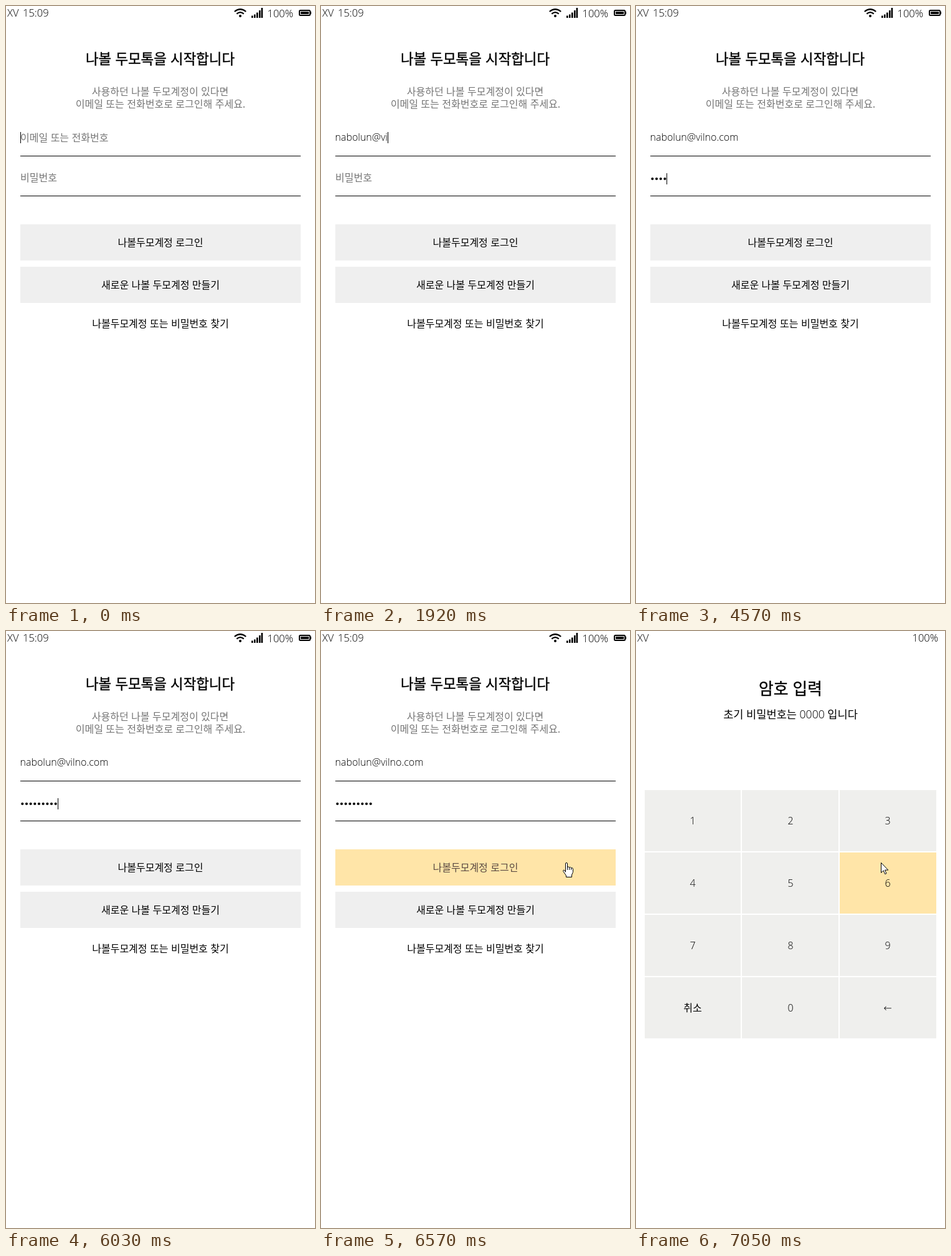
These frames come from a looping animation (496x957 px, 7.65 s). An HTML page:

```html
<!DOCTYPE html>
<html lang="ko">
<head>
<meta charset="utf-8">
<style>
  html, body { margin: 0; width: 100%; height: 100%; overflow: hidden; background: #fff; }
  svg { display: block; width: 100vw; height: 100vh; }
  text { font: 300 16px "Noto Sans CJK KR", "Noto Sans KR", "Noto Sans CJK JP", sans-serif; }
  .mid { text-anchor: middle; }
  .gray { fill: #757575; }
  .latin { font-family: "Open Sans", "Noto Sans CJK KR", sans-serif; }
  .status { font-size: 16.5px; }
  .title { font-weight: 500; stroke: #000; stroke-width: .4; }
  .line { fill: none; stroke: #000; stroke-width: 2.2; }
</style>
</head>
<body>
<svg viewBox="0 0 496 957">
  <text class="latin status" x="2" y="17">XV</text>

  <g id="login">
    <text class="latin status" x="27" y="17">15:09</text>
    <g class="line">
      <path d="M366.8 9Q376 1.5 385.2 9M370.3 12.6Q376 7.6 381.7 12.6"/>
      <rect x="471" y="7" width="17" height="8" rx="1.5" stroke-width="2"/>
    </g>
    <circle cx="376" cy="16" r="2"/>
    <path d="M394 15.5h2.6V19H394zM398 13.5h2.6V19H398zM402 10.5h2.6V19H402zM406 7h2.6v12H406zM409.6 3h2.6v16h-2.6z"/>
    <path d="M473 9h13v4h-13zM488 9h2v4h-2z"/>
    <text class="latin status" x="419.5" y="18">100%</text>

    <text class="mid title" x="247.5" y="93.3" style="font-size:22.4px">나볼 두모톡을 시작합니다</text>
    <text class="mid gray" x="247.5" y="143">사용하던 나볼 두모계정이 있다면</text>
    <text class="mid gray" x="248" y="163">이메일 또는 전화번호로 로그인해 주세요.</text>

    <text id="mailHint" class="gray" x="23" y="217">이메일 또는 전화번호</text>
    <text id="mail" class="latin" x="22.5" y="216"></text>
    <path d="M23 240h450v1H23zM23 304h450v1H23z"/>
    <text id="passHint" class="gray" x="23" y="281">비밀번호</text>
    <g id="dots"></g>
    <rect id="caret" width="1" height="18"/>

    <rect id="button" x="23" y="350" width="450" height="58"/>
    <text id="label" class="mid" x="248" y="385">나볼두모계정 로그인</text>
    <rect x="23" y="418" width="450" height="58" fill="#efefef"/>
    <text class="mid" x="248" y="453">새로운 나볼 두모계정 만들기</text>
    <text class="mid" x="248" y="515">나볼두모계정 또는 비밀번호 찾기</text>
    <path id="hand" fill="#fff" stroke="#000" stroke-linejoin="round"
      d="M392.5 386.5V373q0-1.5 1.5-1.5t1.5 1.5v5.5q1.5-1.5 3 .5 1.7-1.2 3 .7 3-.8 3 2.3v4.5l-2 4.5v3.5h-9v-2.5l-4.5-6.5q-1-2 .8-2.3 1.2 0 2.7 2.8M395.5 378v5M398.5 379v4M401.5 380v3"/>
  </g>

  <g id="pin">
    <text class="latin status" x="443.5" y="17">100%</text>
    <text class="mid title" x="248" y="102" style="font-size:25.8px">암호 입력</text>
    <text class="mid latin" x="248" y="139.5" style="font-size:17.6px">초기 비밀번호는 0000 입니다</text>
    <g id="keys"></g>
    <path fill="#fff" stroke="#000" d="M393.5 371.5v16l3.7-3.5 2.5 5.7 2.3-1-2.5-5.5h5.2z"/>
  </g>
</svg>
<script>
  const LOOP = 7650;
  const MAIL = 'nabolun@vilno.com';
  const mailTimes = [330, 530, 660, 860, 930, 1060, 1130, 1530, 1660, 1920, 2180, 2380, 2780, 3110, 3310, 3380, 3510];
  const passTimes = [3840, 3970, 4170, 4570, 5170, 5500, 5700, 5900, 6030];
  const FOCUS_PASS = 3710, HOVER = 6100, NEXT_PAGE = 7050;
  const DOT = 6.67;

  const el = id => document.getElementById(id);
  const show = (id, on) => el(id).style.display = on ? '' : 'none';
  const count = (times, t) => times.filter(x => x <= t).length;
  const mix = (a, b, k) => `rgb(${a.map((v, i) => Math.round(v + (b[i] - v) * k))})`;

  el('dots').innerHTML = passTimes.map((_, i) =>
    `<circle cx="${23 + DOT * (i + .5)}" cy="277" r="2.1"/>`).join('');

  const keyX = [14, 170, 327], keyW = [154, 155, 155];
  el('keys').innerHTML = [...'123456789', '취소', '0', '←'].map((key, i) => {
    const col = i % 3, y = 255 + 100 * Math.floor(i / 3);
    const font = key === '←' ? ' style="font-family:\'DejaVu Sans\',sans-serif"' : '';
    return `<rect x="${keyX[col]}" y="${y}" width="${keyW[col]}" height="98" fill="${key === '6' ? '#ffe5a8' : '#efefed'}"/>` +
      `<text class="mid latin" x="${[91, 248, 404][col]}" y="${y + 55}"${font}>${key}</text>`;
  }).join('');

  function draw(t) {
    const onLogin = t < NEXT_PAGE;
    show('login', onLogin);
    show('pin', !onLogin);
    if (!onLogin) return;

    const typed = count(mailTimes, t), hidden = count(passTimes, t);
    el('mail').textContent = MAIL.slice(0, typed);
    show('mailHint', !typed);
    show('passHint', !hidden);
    [...el('dots').children].forEach((dot, i) => dot.style.display = i < hidden ? '' : 'none');

    const inPass = t >= FOCUS_PASS;
    const width = inPass ? hidden * DOT : typed ? el('mail').getComputedTextLength() : 0;
    el('caret').setAttribute('x', Math.floor(23 + width));
    el('caret').setAttribute('y', inPass ? 268 : 202);
    show('caret', !(t >= 5100 && t < 5170) && t < 6570);

    const hover = Math.min(3, Math.max(0, Math.floor((t - HOVER) / 70) + 1)) / 3;
    el('button').setAttribute('fill', mix([239, 239, 239], [255, 229, 168], hover));
    el('label').setAttribute('fill', mix([0, 0, 0], [89, 73, 65], hover));
    show('hand', t >= HOVER);
  }

  const start = performance.now();
  function tick() {
    draw((performance.now() - start) % LOOP);
    requestAnimationFrame(tick);
  }
  tick();
</script>
</body>
</html>
```
